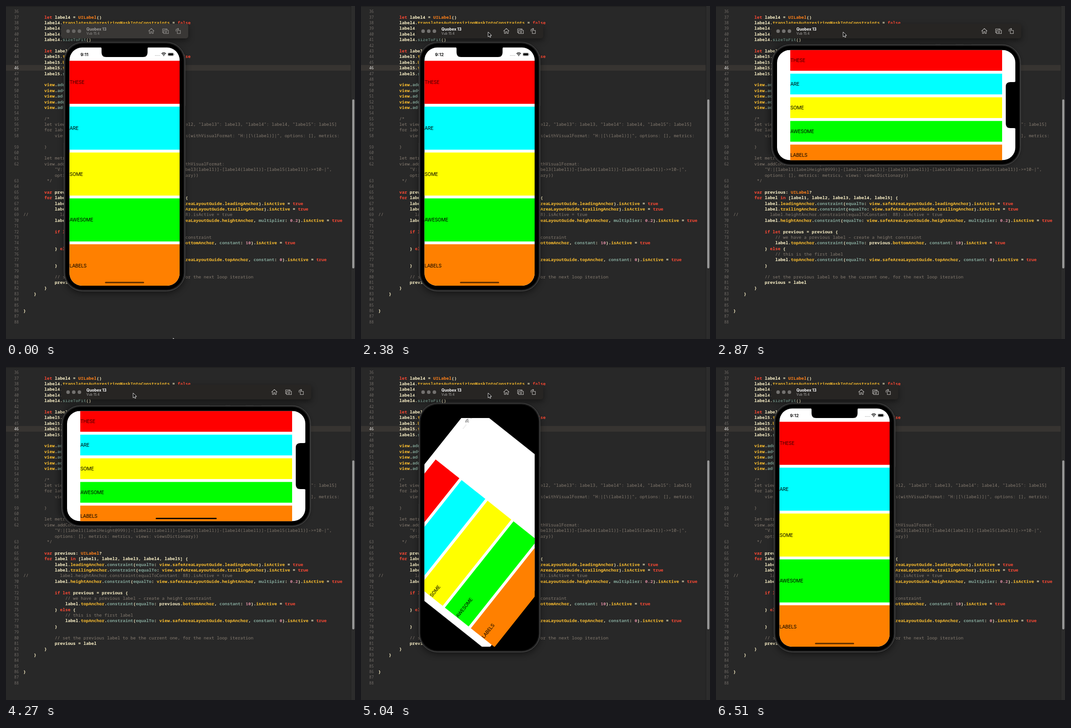
Write an HTML page that moves like this. It is 766 by 731 pixels and loops after 6.65 s.

```html
<!DOCTYPE html>
<html lang="en">
<head>
<meta charset="utf-8">
<title>Rotating labels</title>
<style>
  html, body { margin: 0; width: 100%; height: 100%; overflow: hidden; background: #282828; }
  svg { display: block; width: 100vw; height: 100vh; }
  .code { font: 600 9.575px "Noto Sans Mono", monospace; white-space: pre; fill: #fbf1c7; }
  .num { font: 8.4px "Noto Sans Mono", monospace; fill: #716c67; text-anchor: end; }
  .num.on { fill: #f2f0ec; }
  .comment { fill: #857b70; font-weight: 500; }
  .string { fill: #b8bb26; }
  .keyword { fill: #fb4934; font-weight: 700; }
  .type { fill: #fe8019; }
  .number { fill: #d3869b; }
  .member { fill: #fabd2f; }
  .call { fill: #83a598; }
  .ui { font-family: Inter, sans-serif; }
  .label { font-size: 10.5px; letter-spacing: -.3px; }
  .line { fill: none; stroke-width: 1.1; stroke-linejoin: round; stroke-linecap: round; }
  .shadow { filter: drop-shadow(0 5px 7px rgba(0, 0, 0, .45)); }
</style>
</head>
<body>
<svg id="stage" viewBox="0 0 766 731" preserveAspectRatio="none">
  <defs>
    <clipPath id="screen"><rect x="-121" y="-261.5" width="242" height="523" rx="28"/></clipPath>
  </defs>
  <rect width="766" height="731" fill="#282828"/>
  <rect width="766" height="1.5" fill="#1e1e1e"/>
  <rect y="129.5" width="757" height="12.5" fill="#373431"/>
  <g id="editor"></g>
  <rect x="757" width="9" height="731" fill="#2c2c2c"/>
  <rect x="756.5" width="1" height="731" fill="#1f1f1f"/>
  <rect x="760" y="205" width="4.6" height="371" rx="2.3" fill="#999"/>

  <g id="device">
    <g fill="#1b1b1b" stroke="#3a3a3a" stroke-width=".5">
      <rect x="-135" y="-166" width="3" height="19" rx="1"/>
      <rect x="-135" y="-131" width="3" height="35" rx="1"/>
      <rect x="-135" y="-87" width="3" height="36" rx="1"/>
      <rect x="132" y="-134" width="3" height="73" rx="1"/>
    </g>
    <g class="shadow"><rect id="body" x="-133" y="-273.5" width="266" height="547" rx="41" fill="#1c1c1c"/></g>
    <rect x="-132.5" y="-273" width="265" height="546" rx="40.5" fill="#1c1c1c" stroke="#5b5b5b"/>
    <rect x="-129.5" y="-270" width="259" height="540" rx="37.5" fill="#000"/>
    <g clip-path="url(#screen)">
      <g id="view" class="ui">
        <rect id="page" fill="#fff"/>
        <g id="labels"></g>
        <g id="status">
          <text id="clock" x="33" y="18.6" text-anchor="middle" font-size="9.6" font-weight="600"></text>
          <g id="signals">
            <path d="M-54 17.5H-43" stroke="#aaa" stroke-width="1.4" stroke-dasharray="1.6 1.5"/>
            <path d="M-39.7 13.6a6.6 6.6 0 0 1 9.4 0M-37.8 15.8a4 4 0 0 1 5.6 0" fill="none" stroke="#000" stroke-width="1.5"/>
            <path d="M-36.5 17.3a2.2 2.2 0 0 1 3 0L-35 19Z"/>
            <rect x="-26" y="11.7" width="12.8" height="6.8" rx="2" fill="#fff" stroke="#888" stroke-width=".7"/>
            <rect x="-25" y="12.7" width="10.8" height="4.8" rx="1.1"/>
            <path d="M-12.2 14v2.2" stroke="#888"/>
          </g>
        </g>
        <rect id="home" height="3" rx="1.5"/>
      </g>
    </g>
    <path d="M-54.500-262.500q4 0 4 4v8q0 10 10 10h81q10 0 10-10v-8q0-4 4-4Z"/>
  </g>

  <g id="bar">
    <rect id="plate" class="shadow" x="121" y="39" height="32" rx="5"/>
    <g id="dots">
      <circle cx="136.3" cy="55.2" r="3.9"/><circle cx="148.7" cy="55.2" r="3.9"/><circle cx="161.1" cy="55.2" r="3.9"/>
    </g>
    <text id="title" class="ui" x="176.5" y="54" font-size="8.6" font-weight="700">Quobex 13</text>
    <text id="system" class="ui" x="176.5" y="62.6" font-size="7.1">Vub 15.4</text>
    <g id="icons" class="line">
      <path d="M-87 54.800L-81 49.300L-75 54.800M-85.200 53.500V60.300H-82.400V56.200H-79.600V60.300H-76.800V53.500"/>
      <path d="M-54.500 58.500H-56.200V50.200H-46.500V52M-54 53.200H-51.500L-50.500 52H-47.500L-46.500 53.200H-43.500V60.500H-54Z"/>
      <circle cx="-49" cy="56.700" r="1.900"/>
      <path d="M-24 53.500H-17.300V60.500H-24ZM-26.800 55.500V53Q-26.800 50.500 -24.300 50.500H-21.200M-22.800 48.800L-21.100 50.500L-22.800 52.200"/>
    </g>
  </g>

  <path id="cursor" d="M0 0V10.800L2.500 8.500 4.100 12 5.900 11.200 4.300 7.700H7.700Z" fill="#000" stroke="#fff" stroke-width=".9"/>
</svg>

<script>
// A leading "~" marks the continuation of a wrapped line.
const source = String.raw`
        let label4 = UILabel()
        label4.translatesAutoresizingMaskIntoConstraints = false
        label4.backgroundColor = UIColor.green
        label4.text = "AWESOME"
        label4.sizeToFit()

        let label5 = UILabel()
        label5.translatesAutoresizingMaskIntoConstraints = false
        label5.backgroundColor = UIColor.orange
        label5.text = "LABELS"
        label5.sizeToFit()

        view.addSubview(label1)
        view.addSubview(label2)
        view.addSubview(label3)
        view.addSubview(label4)
        view.addSubview(label5)

        /*
        let viewsDictionary = ["label1": label1, "label2": label2, "label3": label3, "label4": label4, "label5": label5]
        for label in viewsDictionary.keys {
            view.addConstraints( NSLayoutConstraint.constraints(withVisualFormat: "H:|[\(label)]|", options: [], metrics:
~                nil, views: viewsDictionary))
        }

        let metrics = ["labelHeight": 88]
        view.addConstraints( NSLayoutConstraint.constraints(withVisualFormat:
~            "V:|[label1(labelHeight@999)]-[label2(label1)]-[label3(label1)]-[label4(label1)]-[label5(label1)]->=10-|",
~            options: [], metrics: metrics, views: viewsDictionary))
         */

        var previous: UILabel?
        for label in [label1, label2, label3, label4, label5] {
            label.leadingAnchor.constraint(equalTo: view.safeAreaLayoutGuide.leadingAnchor).isActive = true
            label.trailingAnchor.constraint(equalTo: view.safeAreaLayoutGuide.trailingAnchor).isActive = true
//            label.heightAnchor.constraint(equalToConstant: 88).isActive = true
            label.heightAnchor.constraint(equalTo: view.safeAreaLayoutGuide.heightAnchor, multiplier: 0.2).isActive = true

            if let previous = previous {
                // we have a previous label – create a height constraint
                label.topAnchor.constraint(equalTo: previous.bottomAnchor, constant: 10).isActive = true
            } else {
                // this is the first label
                label.topAnchor.constraint(equalTo: view.safeAreaLayoutGuide.topAnchor, constant: 0).isActive = true
            }

            // set the previous label to be the current one, for the next loop iteration
            previous = label
        }
    }


}

`;

const $ = id => document.getElementById(id);
const set = (node, attrs) => { for (const key in attrs) node.setAttribute(key, attrs[key]); };
const add = (parent, tag, attrs) => {
  const node = document.createElementNS("http://www.w3.org/2000/svg", tag);
  set(node, attrs);
  return parent.appendChild(node);
};
const lerp = (a, b, p) => a + (b - a) * p;
const ramp = (t, from, to) => Math.min(1, Math.max(0, (t - from) / (to - from)));
const ease = p => p * p * (3 - 2 * p);

const tokenClasses = ["comment", "string", "keyword", "type", "number", "member", "call"];
const tokens = /(\/\/.*)|("[^"]*")|\b(let|var|for|in|if|else|true|false)\b|\b(UILabel|UIColor)\b|\b(\d[\d.]*)|\b(view|translatesAutoresizingMaskIntoConstraints|backgroundColor|text|safeAreaLayoutGuide|isActive|\w+Anchor)\b|\b(constraint|equalTo|multiplier|constant|sizeToFit|addSubview)\b/g;
const escapeText = s => s.replace(/&/g, "&amp;").replace(/</g, "&lt;").replace(/>/g, "&gt;");
const span = (name, s) => `<tspan class="${name}">${s}</tspan>`;
const highlight = s => escapeText(s).replace(tokens, (match, ...groups) =>
  span(tokenClasses[groups.slice(0, 7).findIndex(g => g !== undefined)], match));

let lineNumber = 35, inComment = false;
source.split("\n").forEach((raw, row) => {
  const y = 15.3 + row * 12.39;
  const line = raw.replace(/^~/, "");
  if (raw === line) {
    lineNumber++;
    add($("editor"), "text", { class: lineNumber === 46 ? "num on" : "num", x: 28, y }).textContent = lineNumber;
  }
  if (line.includes("/*")) inComment = true;
  const indent = line.length - line.trimStart().length;
  const code = line.trim();
  if (code) {
    add($("editor"), "text", { class: "code", x: 38 + indent * 5.745, y }).innerHTML =
      inComment ? span("comment", escapeText(code)) : highlight(code);
  }
  if (line.includes("*/")) inComment = false;
});

const labels = [
  ["THESE", "#f00", "#3a0000"], ["ARE", "#0ff", "#000"], ["SOME", "#ff0", "#000"],
  ["AWESOME", "#0f0", "#000"], ["LABELS", "#ff8000", "#000"]
].map(([word, fill, ink]) => {
  const group = add($("labels"), "g", {});
  const box = add(group, "rect", { fill });
  add(group, "text", { class: "label", x: .3, y: 3.8, fill: ink }).textContent = word;
  return { group, box };
});

const LOOP = 6650, STEP = 70;
const FOCUS = 910, TURN = 2520, SPIN_START = 2555, TURN_BACK = 4900, SPIN = 310;

const path = [[0, 367, 729], [700, 277.5, 57], [770, 279, 57], [5320, 279, 57], [6020, 387, 651], [6510, 370, 733], [LOOP, 370, 733]];
function cursorAt(t) {
  const i = path.findIndex(stop => stop[0] > t);
  const [t0, x0, y0] = path[i - 1], [t1, x1, y1] = path[i];
  const p = ease(ramp(t, t0, t1));
  return [lerp(x0, x1, p), lerp(y0, y1, p)];
}

function drawView(t) {
  const spin = t < TURN_BACK
    ? ease(ramp(t, SPIN_START, SPIN_START + SPIN))
    : 1 - ease(ramp(t, TURN_BACK, TURN_BACK + SPIN));
  const wide = t > SPIN_START && t <= TURN_BACK;
  const width = lerp(242, 523, spin), height = lerp(523, 242, spin);
  set($("view"), { transform: `rotate(${-90 * spin}) translate(${-width / 2} ${-height / 2})` });
  set($("page"), { width, height });

  // A label side that grows glides to its new size; one that shrinks jumps there.
  const inset = lerp(0, 29, spin);
  const labelWidth = wide ? width - 2 * inset : 242;
  const labelHeight = wide ? 45.5 : lerp(94.5, 45.5, spin);
  labels.forEach(({ group, box }, i) => {
    const middle = lerp(76.4 + 100.7 * i, 22.9 + 51.9 * i, spin);
    set(group, { transform: `translate(${inset} ${middle})` });
    set(box, { y: -labelHeight / 2, width: labelWidth, height: labelHeight });
  });

  set($("status"), { opacity: wide ? 0 : ramp(1 - spin, 0, .8) });
  $("clock").textContent = t < FOCUS ? "9:11" : "9:12";
  set($("signals"), { transform: `translate(${width} 0)` });

  const homeWidth = wide ? 134 : 86;
  const shown = wide ? ramp(t, 3010, 3360) : t < TURN_BACK ? 1 : ramp(t, 5320, 5740);
  set($("home"), {
    x: (width - homeWidth) / 2, y: height - (wide ? 7.5 : 8.5), width: homeWidth,
    opacity: shown * (wide ? .92 : .65)
  });
}

function draw(now) {
  const t = Math.min(LOOP - 2 * STEP, Math.floor((now % LOOP) / STEP) * STEP);
  const sideways = t >= TURN && t < TURN_BACK;
  const active = t >= FOCUS;
  const right = sideways ? 670 : 400;

  set($("device"), { transform: sideways ? "translate(395.5 217.5) rotate(90)" : "translate(260.2 352.6)" });
  drawView(t);

  set($("plate"), { width: right - 121, fill: active ? "#272523" : "#393735" });
  set($("dots"), { fill: active ? "#73716f" : "#686664" });
  set($("title"), { fill: active ? "#fff" : "#a19f9d" });
  set($("system"), { fill: active ? "#aaa8a6" : "#918f8d" });
  set($("icons"), { transform: `translate(${right} 0)`, stroke: active ? "#b9b7b5" : "#94928f" });
  set($("cursor"), { transform: `translate(${cursorAt(t)})` });
}

const start = performance.now();
function tick() {
  draw(performance.now() - start);
  requestAnimationFrame(tick);
}
tick();
</script>
</body>
</html>
```
